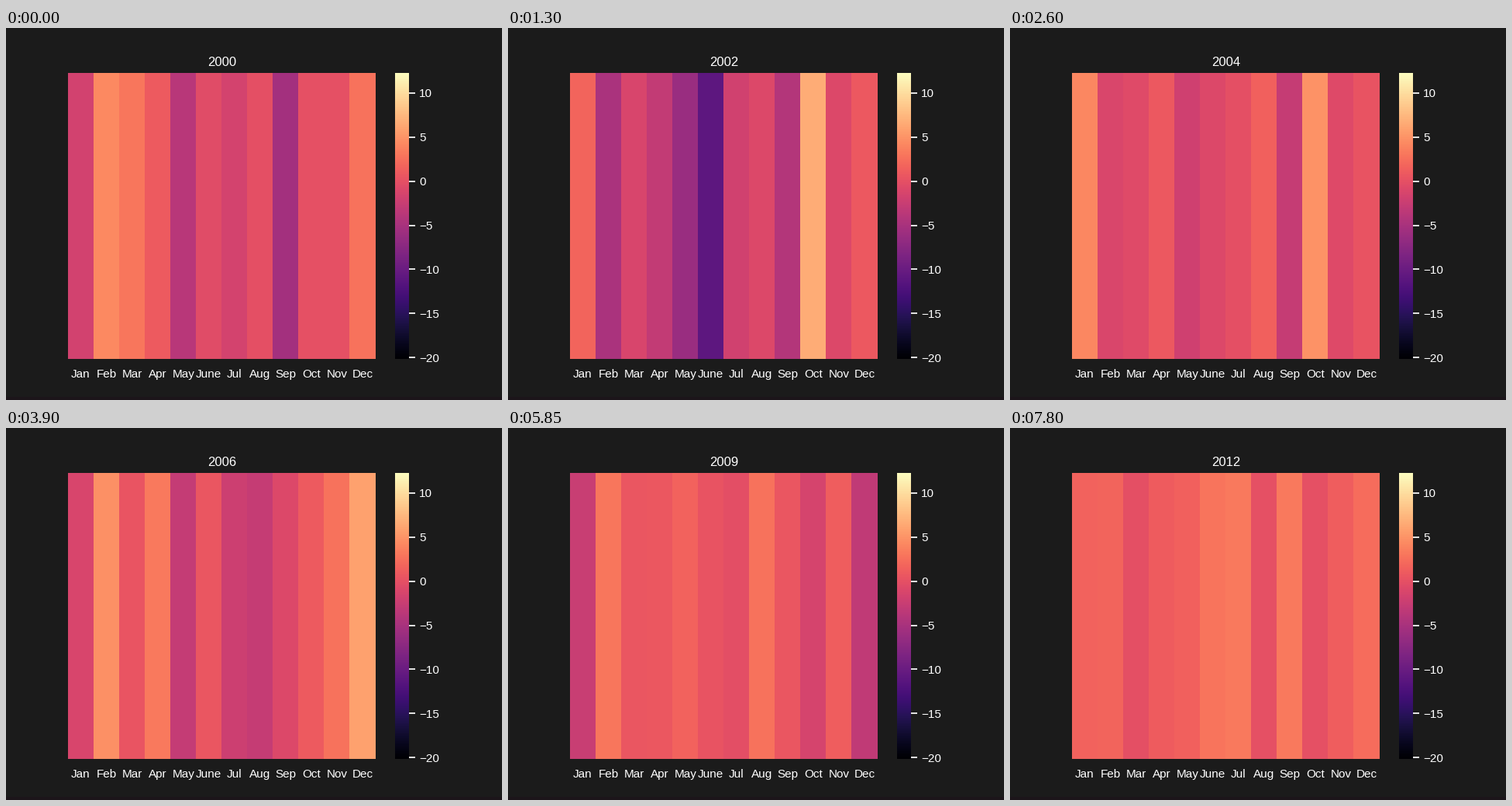
Recreate the animation shown at these times as a matplotlib script. Size 640x480 px, loop 8000 ms.

```python
import matplotlib.pyplot as plt
import numpy as np
from matplotlib.animation import FuncAnimation
from matplotlib.patches import Rectangle

BACKGROUND = "#1b1b1b"
INTERVAL = 50
FRAMES_PER_YEAR = 13
FRAME_COUNT = 160
YEARS = np.arange(2000, 2013)
VMIN, VMAX = -20.17, 12.305
MONTHS = "Jan Feb Mar Apr May June Jul Aug Sep Oct Nov Dec".split()

# Months that stand out from the usual spread.
EXTREMES = {
    (2000, "Feb"): 4.3, (2000, "Sep"): -5.4,
    (2002, "May"): -6.2, (2002, "June"): -11, (2002, "Oct"): 6.7,
    (2004, "Oct"): 4.9, (2006, "May"): -2.9,
    (2008, "Mar"): 4.5, (2008, "June"): -6.1,
    (2008, "Sep"): -20.1, (2008, "Oct"): -8.3,
    (2010, "Feb"): 5.9, (2010, "Apr"): -6,
}


def build_returns():
    """Monthly noise around a slow cycle, with the extremes set on top."""
    rng = np.random.default_rng(4)
    cycle = np.interp(YEARS, [2000, 2002, 2006, 2008, 2010],
                      [-0.4, -1.2, 1.1, -0.9, 1.6])
    returns = cycle[:, None] + rng.normal(0, 2, (len(YEARS), len(MONTHS)))
    for (year, month), value in EXTREMES.items():
        returns[year - YEARS[0], MONTHS.index(month)] = value
    return returns


plt.rcParams.update({
    "font.family": "Liberation Sans",
    "text.color": "white",
    "xtick.labelcolor": "white",
    "ytick.color": "white",
    "xtick.labelsize": 11,
    "ytick.labelsize": 11,
    "axes.titlesize": 12,
    "xtick.major.size": 6,
    "ytick.major.size": 6,
    "ytick.major.width": 1.25,
})

returns = build_returns()
fig, ax = plt.subplots(figsize=(6.4, 4.8), dpi=100, facecolor=BACKGROUND)
fig.add_artist(Rectangle((0, 0), 1, 4 / 480, transform=fig.transFigure,
                         facecolor="#1c151a", edgecolor="none"))

mesh = ax.pcolormesh(returns[:1], cmap="magma", vmin=VMIN, vmax=VMAX)
bar = fig.colorbar(mesh, ax=ax, pad=0.05057, ticks=range(-20, 11, 5))
bar.outline.set_visible(False)
ax.set_xticks(np.arange(len(MONTHS)) + 0.5, MONTHS)
ax.set_yticks([])
ax.tick_params(axis="x", bottom=False)
for spine in ax.spines.values():
    spine.set_visible(False)
title = ax.set_title(str(YEARS[0]))


def update(frame):
    index = frame // FRAMES_PER_YEAR
    mesh.set_array(returns[index:index + 1])
    title.set_text(str(YEARS[index]))
    return mesh, title


animation = FuncAnimation(fig, update, frames=FRAME_COUNT, interval=INTERVAL,
                          repeat=True, repeat_delay=0)
plt.show()
```
